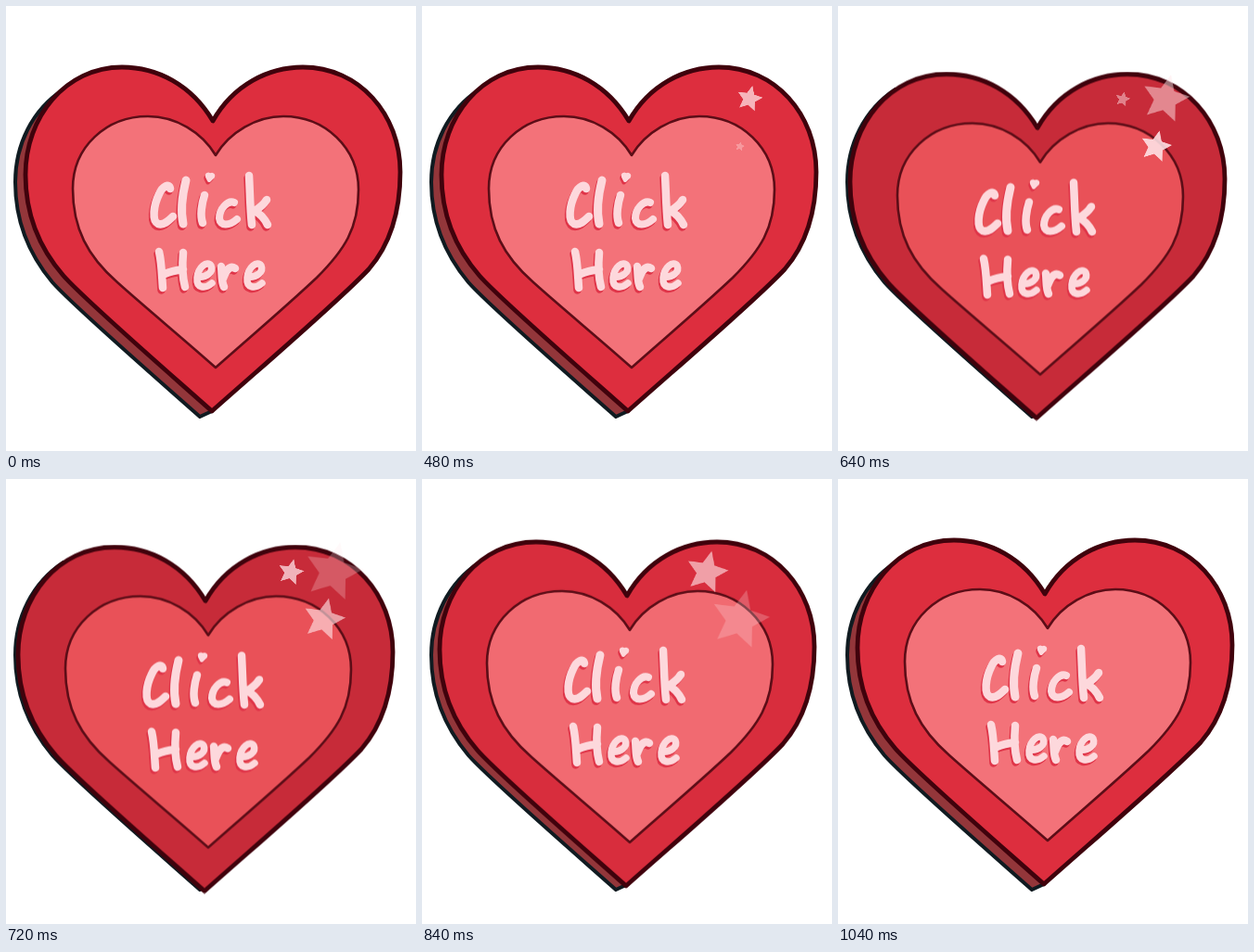
Recreate the animation shown at these times as an HTML page. Size 442 px wide and 480 px high, loop 1760 ms.

```html
<!DOCTYPE html>
<html lang="en">
<head>
<meta charset="utf-8">
<title>Click Here</title>
<style>
  html, body { margin: 0; width: 100%; height: 100%; overflow: hidden; background: #fff; }
  svg { display: block; width: 442px; height: 480px; }
  path, use { stroke-linejoin: round; stroke-linecap: round; }

  .back { fill: #93363a; stroke: #101b21; stroke-width: 4; }
  .rim { fill: #dd2e3e; stroke: #40020c; stroke-width: 4.8; }
  .face { fill: #f37279; stroke: #5c0d17; stroke-width: 2.6; }
  .letters { fill: none; stroke: #fdd8dc; stroke-width: 8.5; }
  .shadow { stroke: #df3448; }
  .star { fill: #ffe6e9; opacity: 0; }

  .button { animation: press 1760ms infinite; }
  .rim { animation: rim 1760ms infinite; }
  .face { animation: face 1760ms infinite; }
  .star { animation: burst 1760ms infinite; }
  .first { animation-delay: 320ms; }
  .second { animation-delay: 440ms; }
  .third { animation-delay: 560ms; }

  /* Everything advances in 40 ms steps. */
  @keyframes press {
    0%, 27.27% { transform: translate(0, 0); animation-timing-function: steps(4); }
    36.36%, 40.9% { transform: translate(-8px, 7.5px); animation-timing-function: steps(4); }
    49.99%, 100% { transform: translate(0, 0); }
  }
  @keyframes rim {
    0%, 27.27% { fill: #dd2e3e; animation-timing-function: steps(4); }
    36.36%, 40.9% { fill: #c72b39; animation-timing-function: steps(4); }
    49.99%, 100% { fill: #dd2e3e; }
  }
  @keyframes face {
    0%, 27.27% { fill: #f37279; animation-timing-function: steps(4); }
    36.36%, 40.9% { fill: #e95158; animation-timing-function: steps(4); }
    49.99%, 100% { fill: #f37279; }
  }
  @keyframes burst {
    0% { opacity: .2; transform: scale(2.5); animation-timing-function: steps(5); }
    11.363% { opacity: .87; transform: scale(17.5); animation-timing-function: steps(7); }
    27.272%, 100% { opacity: 0; transform: scale(38.5); }
  }
</style>
</head>
<body>
<svg viewBox="0 0 442 480" role="img" aria-label="Click Here">
  <defs>
    <path id="e" stroke-width="7.5" d="M207 292C216 293 224 287 221 280C217 274 207 282 206 293C205 305 215 305 222 299"/>
    <g id="words">
      <path d="M177 197C176 191 169 194 165 203C159 215 157 232 164 235C170 237 175 232 180 227"/>
      <path stroke-width="9" d="M194 188C190 204 188 221 191 235"/>
      <path d="M214 204C211 213 209 226 212 234"/>
      <path stroke-width="4" d="M219 188L217 184C216 181 219 181 220 183C222 181 224 182 223 184Z"/>
      <path stroke-width="8" d="M246 212C239 209 230 219 230 229C231 238 241 237 249 230"/>
      <path d="M262 183C263 200 263 218 265 236M281 209C278 214 273 218 268 221C274 224 279 230 282 236"/>
      <path d="M165 265C168 278 168 292 169 304M171 289C178 286 184 285 191 284M191 266C190 278 190 292 193 303"/>
      <use href="#e"/>
      <path d="M232 281C233 289 232 297 235 303M234 294C237 286 241 279 247 283"/>
      <use href="#e" x="54"/>
    </g>
    <path id="star"/>
  </defs>

  <path class="back" d="M62 90C28 112 10 150 10 190C10 230 24 267 50 298C72 323 148 389 209 443L222 437Z"/>
  <g class="button">
    <path class="rim" d="M223 124C200 85 163 66 125 66C64 66 21 120 21 182C21 224 35 260 62 291
      C84 316 160 382 222 437C284 382 360 317 391 284C417 254 425 217 425 179
      C425 117 381 66 320 66C283 66 245 85 223 124Z"/>
    <path class="face" d="M226 161C211 136 183 119 153 119C108 119 72 152 72 197C72 240 88 270 120 298
      C150 325 190 358 226 390C262 358 300 326 335 293C365 263 380 240 380 198
      C380 153 344 119 299 119C270 119 241 136 226 161Z"/>
    <use class="letters shadow" href="#words" transform="translate(-1.5 2.5)"/>
    <use class="letters" href="#words"/>
  </g>

  <g transform="translate(353 100)"><use class="star first" href="#star"/></g>
  <g transform="translate(342.7 151.5)"><use class="star second" href="#star"/></g>
  <g transform="translate(307 100.5)"><use class="star third" href="#star"/></g>
</svg>
<script>
  // Unit star, slightly tilted.
  const points = Array.from({ length: 10 }, (_, i) => {
    const r = i % 2 ? 0.47 : 1;
    const a = (i * 36 - 77) * Math.PI / 180;
    return `${(r * Math.cos(a)).toFixed(4)} ${(r * Math.sin(a)).toFixed(4)}`;
  });
  document.getElementById('star').setAttribute('d', `M${points.join('L')}Z`);
</script>
</body>
</html>
```
